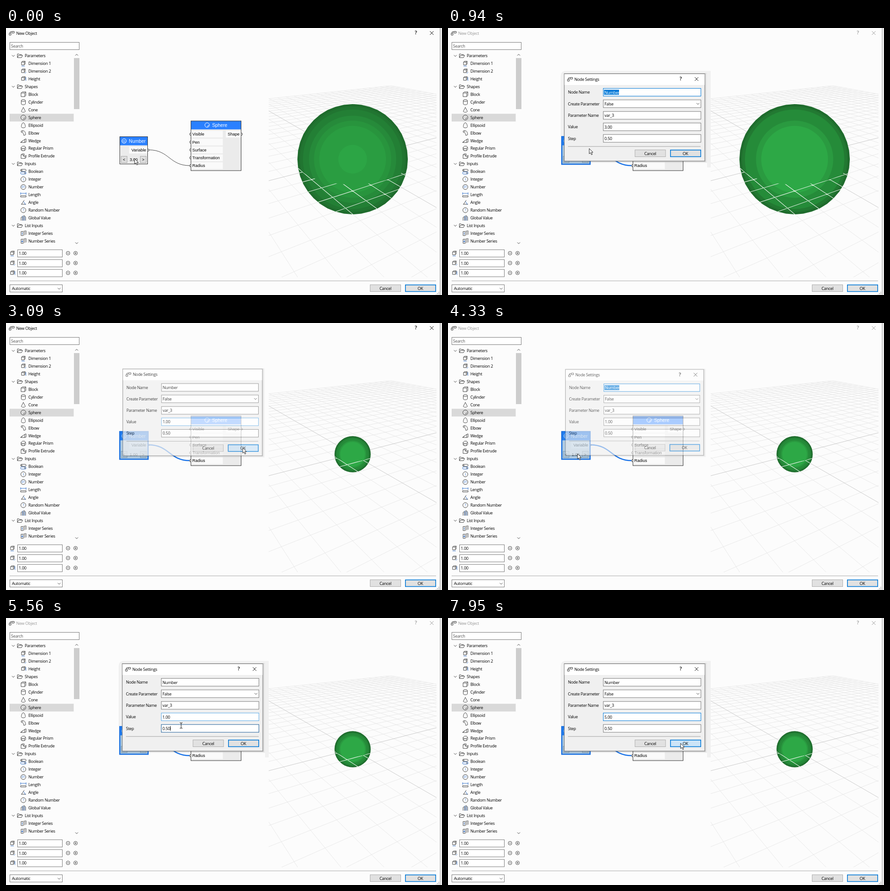
Recreate the animation shown at these times as an HTML page. Size 956 by 586 pixels, loop 8 s.

```html
<!DOCTYPE html>
<html lang="en">
<head>
<meta charset="utf-8">
<title>Node editor</title>
<style>
html, body { margin: 0; width: 100%; height: 100%; overflow: hidden; background: #fcfcfc; }
svg { display: block; width: 956px; height: 586px; }
text { font: 9px "Open Sans", "Noto Sans", sans-serif; letter-spacing: -.3px; fill: #000; white-space: pre; }
.node text { font: 9px "Liberation Sans", Arial, sans-serif; letter-spacing: 0; }
.node text.head { font-size: 10.3px; fill: #fff; }
.icon { fill: none; stroke: #333; stroke-width: .9; }
.icon .b, .icon.b { stroke: #2468c8; }
</style>
</head>
<body>
<svg viewBox="0 0 956 586" xmlns="http://www.w3.org/2000/svg">
  <defs>
    <clipPath id="view"><rect x="576" y="120" width="368" height="427"/></clipPath>
    <clipPath id="front"><path id="frontPath"/></clipPath>
    <linearGradient id="edge"><stop stop-color="#d4d4d4"/><stop offset="1" stop-color="#f4f4f4"/></linearGradient>
  </defs>
  <rect width="956" height="586" fill="#fcfcfc"/>
  <g id="frame"></g>
  <g id="sidebar"></g>
  <g id="floor" clip-path="url(#view)"></g>
  <g id="ball"></g>
  <g clip-path="url(#front)"><path id="overlay" fill="none" stroke="#eef5ee" stroke-width="1.1"/></g>
  <g id="nodes" class="node"></g>
  <g id="dialog"></g>
  <g id="cursor"></g>
</svg>
<script>
const LOOP = 8000;
const $ = id => document.getElementById(id);
const BLUE = '#0078d7';

const text = (x, y, s, extra = '') => `<text x="${x}" y="${y + 3.2}" ${extra}>${s.replace(/</g, '&lt;')}</text>`;
const mid = 'text-anchor="middle"';
const rect = (x, y, w, h, fill, stroke = 'none', sw = 1) =>
  `<rect x="${x}" y="${y}" width="${w}" height="${h}" fill="${fill}" stroke="${stroke}" stroke-width="${sw}"/>`;
const path = (d, extra = '') => `<path d="${d}" ${extra}/>`;
const circle = (x, y, r, extra = '') => `<circle cx="${x}" cy="${y}" r="${r}" ${extra}/>`;
const icon = (x, y, body) => `<g class="icon" transform="translate(${x} ${y})">${body}</g>`;
const line = (x, y, d, color = '#333', w = 1) =>
  `<path transform="translate(${x} ${y})" d="${d}" fill="none" stroke="${color}" stroke-width="${w}"/>`;
const chevron = (x, y, up) => line(x, y, up ? 'M-3 1.5L0 -1.5L3 1.5' : 'M-3 -1.5L0 1.5L3 -1.5', '#444');
const closeMark = (x, y, color) => line(x, y, 'M-4 -4L4 4M4 -4L-4 4', color);
const helpMark = (x, y, color) => text(x, y, '?', `${mid} style="fill:${color};font-size:11px;font-weight:600"`);
const appIcon = (x, y, color) => line(x, y, 'M-5 0h4v4h-4zM1 -4h5v3.500h-5zM-3 0v-3h4', color);
const button = (x, y, label, primary, hover) =>
  (primary
    ? rect(x + 1.3, y + .8, 66.4, 14.6, hover ? '#cce4f7' : '#e1e1e1', BLUE, 1.6)
    : rect(x + .5, y + .5, 67, 15, '#e1e1e1', '#adadad')) +
  text(x + 34, y + 8.5, label, mid);

/* ---------- icons, drawn around 0,0 ---------- */
const cube = path('M-5 -3H3V5H-5ZM-5 -3L-2.500 -5.500H5.500L3 -3M5.500 -5.500V2.500L3 5');
const smallCube = path('M-4 -3H2V3H-4ZM-4 -3L-2 -5H4L2 -3M4 -5V1L2 3');
const blue = d => path(d, 'class="b"');
const ring = s => circle(0, 0, 5.5) + `<text text-anchor="middle" y="2.500" style="font-size:7px;fill:#2468c8;stroke:none">${s}</text>`;
const sphereIcon = circle(0, 0, 5.5) + path('M3 0A3.500 3.500 0 0 1 0 3');
const series = path('M-5 -4H0V5H-5ZM1 -5H3V4M4 -5.500H6V3') + blue('M-2.500 -2V3');
const ICONS = {
  'Dimension 1': smallCube + blue('M-4 5.500H3'),
  'Dimension 2': smallCube + blue('M3 5L6 2'),
  'Height': smallCube + blue('M5.500 -4V4'),
  'Block': cube,
  'Cylinder': path('M-4.500 -3.500V4C-4.500 6.500 4.500 6.500 4.500 4V-3.500') + '<ellipse cy="-3.500" rx="4.500" ry="2"/>',
  'Cone': path('M0 -5.500L-4.500 3.500C-3 6 3 6 4.500 3.500Z'),
  'Sphere': sphereIcon,
  'Ellipsoid': path('M0 -5.500C3 -5.500 4.500 1 4.500 3C4.500 6.500 -4.500 6.500 -4.500 3C-4.500 1 -3 -5.500 0 -5.500Z'),
  'Elbow': path('M-5 -4L-1 -5.500C3 -5 5 -1 5 4L1 5.500C1 1 -1 -1 -4 -1ZM-3 -4L0 -2'),
  'Wedge': path('M-6 4L3 -3L6 -4V3L3 4ZM3 4V-3M-6 4L-2 0'),
  'Regular Prism': path('M-5 -2L-2 -5H3L5 -2L2 0H-3ZM-5 -2V3L-3 5H2L5 3V-2M-3 0V5M2 0V5'),
  'Profile Extrude': path('M-5 -3H0V0H4V5H-5ZM-5 -3L-3 -5H2V-2L0 0M4 0L6 -2V3L4 5'),
  'Boolean': '<rect x="-6" y="-5" width="12" height="4.500" rx="2"/><rect class="b" x="-6" y="1" width="12" height="4.500" rx="2"/>' + circle(-3.5, -2.7, 1) + circle(3.5, 3.2, 1),
  'Integer': ring('1'),
  'Number': ring('01'),
  'Length': blue('M-6 -5V0M6 -5V0M-6 -3H6') + path('M-6 2H6V5H-6Z'),
  'Angle': path('M-5 4H6M-4 4L2 -5') + blue('M0 -2Q4 0 4 5'),
  'Random Number': ring('?'),
  'Global Value': path('M-5 6V-1L-2 -3V6M1 6V-5Q4 -5 5 -1V6') + blue('M-1 6V-5M3 6V-3'),
  'Integer Series': series,
  'Number Series': series + blue('M-5 1H0'),
};
const GROUPS = {
  Parameters: ['Dimension 1', 'Dimension 2', 'Height'],
  Shapes: ['Block', 'Cylinder', 'Cone', 'Sphere', 'Ellipsoid', 'Elbow', 'Wedge', 'Regular Prism', 'Profile Extrude'],
  Inputs: ['Boolean', 'Integer', 'Number', 'Length', 'Angle', 'Random Number', 'Global Value'],
  'List Inputs': ['Integer Series', 'Number Series'],
};

function sidebar() {
  let out = rect(8.5, 31.5, 152, 16, '#fff', '#7a7a7a') + text(11, 40, 'Search', 'style="fill:#555"');
  let y = 61;
  const next = () => y += 16.94;
  for (const [group, items] of Object.entries(GROUPS)) {
    out += chevron(16, y) + text(41, y, group) +
      icon(30, y, path('M-5 4V-4H-1.500L0 -2.500H4V-1M-5 4L-2.500 -1H6.500L4 4Z'));
    next();
    for (const name of items) {
      if (name === 'Sphere') out += rect(8, y - 8.3, 140.500, 17, '#d9d9d9');
      out += icon(38, y, ICONS[name]) + text(49, y, name);
      next();
    }
  }
  out += rect(149, 66, 12, 112, '#cdcdcd') + chevron(155, 59, true) + chevron(155, 472);
  ['Dimension 1', 'Dimension 2', 'Height'].forEach((name, i) => {
    const cy = 494.7 + i * 21.6;
    out += icon(14, cy, ICONS[name]) + rect(25.5, cy - 8, 98, 16, '#fff', '#7a7a7a') + text(28, cy + .3, '1.00');
    out += icon(136, cy - .5, circle(0, 0, 4) + path('M-2 0H2')) + icon(152.5, cy - .5, circle(0, 0, 4) + path('M-2 0H2M0 -2V2'));
  });
  return out;
}

function frame(active) {
  const ink = active ? '#000' : '#999';
  return appIcon(12, 11.5, '#333') + text(22.5, 11.5, 'New Object', `style="fill:${ink}"`) +
    helpMark(898.5, 11, ink) + closeMark(933.5, 11, ink) +
    rect(951, 0, 1, 586, active ? '#aaa' : '#c4c4c4') + rect(952, 0, 4, 586, 'url(#edge)') +
    rect(8, 554.500, 935, 1, '#a8a8a8') +
    rect(8.5, 563.500, 115, 16, '#fff', '#7a7a7a') + text(13, 572, 'Automatic') + chevron(116.5, 572) +
    button(798, 563, 'Cancel') + button(874.5, 563, 'OK', true) +
    line(949, 583, 'M0 -4V-2M0 -1V1M-3 -1V1M0 2V3M-3 2V3M-6 2V3', '#aaa', 1.5);
}

/* ---------- 3D view: ground grid seen by a perspective camera ---------- */
const CX = 760, CY = 288, FOCAL = 626, DIST = 15.8, HALF = 20;
const PITCH = .395, YAW = .588;
const depth = Y => DIST + Y * Math.cos(PITCH);
const project = (X, Y) => [CX + FOCAL * X / depth(Y), CY - FOCAL * Y * Math.sin(PITCH) / depth(Y)];
const pt = p => p.map(v => v.toFixed(1)).join(' ');

function gridLine(k, family) {
  const c = Math.cos(YAW), s = Math.sin(YAW);
  const [ox, oy, dx, dy] = family ? [-s * k, c * k, c, s] : [c * k, s * k, -s, c];
  const near = ((.5 - DIST) / Math.cos(PITCH) - oy) / dy;
  const from = Math.max(-HALF, near);
  if (from >= HALF) return '';
  const end = q => pt(project(ox + dx * q, oy + dy * q));
  return `M${end(from)}L${end(HALF)}`;
}
let grid = '';
for (let k = -HALF; k <= HALF; k++) if (k) grid += gridLine(k, 0) + gridLine(k, 1);
const axes = gridLine(0, 0) + gridLine(0, 1);

function ball(radius, smooth) {
  const R = FOCAL * radius / Math.sqrt(DIST * DIST - radius * radius);
  const corners = Array.from({ length: 40 }, (_, i) =>
    [CX + R * Math.cos(i * Math.PI / 20), CY + R * Math.sin(i * Math.PI / 20)]);
  const bands = smooth
    ? [[.955, '#217531'], [.9, '#237f35'], [.79, '#268a3a'], [.7, '#28943d'], [.605, '#2a9d41'], [.26, '#2ca545']]
    : radius > 2
      ? [[.955, '#227932'], [.9, '#258b39'], [.7, '#2a9a40'], [.605, '#2da846']]
      : [[.94, '#227c34'], [.88, '#258b39'], [.75, '#2a9a40'], [.68, '#2da846']];
  const tilt = Math.asin(radius / (DIST * Math.cos(PITCH)));
  const rim = [];
  for (let i = 0; i <= 30; i++) {
    const a = Math.PI + tilt + (Math.PI - 2 * tilt) * i / 30;
    rim.push(pt(project(radius * Math.cos(a), radius * Math.sin(a))));
  }
  $('frontPath').setAttribute('d', `M${rim.join('L')}A${R} ${R} 0 0 1 ${rim[0]}Z`);
  return `<polygon points="${corners.map(pt).join(' ')}" fill="#1f6c2d"/>` +
    bands.map(([q, color]) => circle(CX, CY, (R * q).toFixed(1), `fill="${color}"`)).join('');
}

/* ---------- nodes ---------- */
const port = (x, y, right) => path(`M${x} ${y - 2.5}a2.500 2.500 0 0 ${right ? 1 : 0} 0 5`, 'fill="#fff" stroke="#333"');

function nodes(value, selected) {
  let out = path('M313 267.500C358 267.500 358 302 403 302',
    `fill="none" stroke="${selected ? '#1a73e8' : '#444'}" stroke-width="${selected ? 2.4 : 1}"`);
  out += rect(405.5, 204, 110, 109, '#ebebeb') + rect(405.5, 204, 110, 18.5, '#2a80ff');
  ['Visible', 'Pen', 'Surface', 'Transformation', 'Radius'].forEach((name, i) => {
    const y = 233 + i * 17.3;
    out += rect(406, y - 7.5, 69.5, 15, '#fafafa') + text(408.5, y, name) + port(405, y);
  });
  out += rect(482, 225.5, 33, 15, '#fafafa') + text(486, 233, 'Shape') + port(516, 233, true) +
    rect(405.5, 204, 110, 109, 'none', '#333') +
    `<g fill="none" stroke="#fff">${circle(441, 213, 5)}${path('M444 213A3 3 0 0 1 441 216')}</g>` +
    text(452, 213.5, 'Sphere', 'class="head"');

  out += rect(249.5, 238.5, 61, 60, '#ebebeb') + rect(249.5, 238.5, 61, 19, '#2a80ff') +
    circle(259, 248, 5, 'fill="none" stroke="#fff"') + text(259, 247.4, '01', `${mid} style="font-size:6.500px;fill:#fff"`) +
    text(269.5, 248.5, 'Number', 'class="head"') +
    rect(270, 260.5, 40, 15, '#fafafa') + text(275, 268, 'Variable') + port(311, 268, true) +
    rect(252.5, 281.5, 13, 14, '#dedede', '#aaa') + rect(294.5, 281.5, 13, 14, '#dedede', '#aaa') +
    text(259, 288.5, '<', mid) + text(301, 288.5, '>', mid) + text(280, 288.5, value, mid);
  out += selected
    ? rect(249.5, 238.5, 62, 60.500, 'rgba(20,120,200,.28)', '#1a70e0', 2.6)
    : rect(249.5, 238.5, 61, 60, 'none', '#333');
  return out;
}

/* ---------- dialog ---------- */
const FIELD_Y = [141, 166.3, 191.7, 217, 242.3];
const LABELS = ['Node Name', 'Create Parameter', 'Parameter Name', 'Value', 'Step'];

function dialog(s) {
  if (!s.opacity) return '';
  const ghost = s.opacity === 1
    ? path('M247 237V106Q247 94 259 94H576V306H568V100H255V237Z', 'fill="#f1f1f1"') : '';
  let out = rect(254, 99, 314, 197, 'rgba(0,0,0,.06)') + rect(254, 99, 311.5, 195, 'rgba(0,0,0,.12)') +
    rect(255, 100.5, 308, 191.500, '#f0f0f0', '#777') + rect(255.5, 101, 307, 24, '#fff') +
    appIcon(267, 112.500, '#333') + text(277, 112.500, 'Node Settings');
  if (!s.closing) out += helpMark(510, 112, '#000') + closeMark(545, 112, '#222');
  ['Number', 'False', 'var_3', s.value, '0.50'].forEach((content, i) => {
    const y = FIELD_Y[i], focus = s.focus === i;
    const leaving = i === 3 && (s.focus === 4 || s.closing);
    const width = i ? 19 : 33;
    const border = leaving ? '#5aa9e6' : !focus ? '#7a7a7a' : i === 4 ? '#1b5c96' : BLUE;
    out += text(263, y, LABELS[i]) + rect(340.5, y - 8.5, 214, 17, '#fff', border);
    const start = focus ? Math.max(0, Math.min(width, s.selectFrom - 342)) : width;
    if (start < width) out += rect(342 + start, y - 5.5, width - start, 11, BLUE);
    out += text(343, y + .3, content, focus && start < width / 2 ? 'style="fill:#fff"' : '');
    if (focus && start >= width && i === 4) out += rect(360, y - 5, 1, 10, '#000');
    if (i === 1) out += chevron(548, y);
  });
  out += rect(263, 259.5, 291, 1, '#a0a0a0') + button(409.5, 267, 'Cancel') + button(486.5, 267, 'OK', true, s.hover);
  return `${ghost}<g opacity="${s.opacity}" transform="translate(409 196) scale(${s.scale}) translate(-409 -196)">${out}</g>`;
}

/* ---------- timeline ---------- */
// [start, end, number of picture changes]
const BURSTS = [[380, 1400, 8], [1520, 1880, 4], [2290, 3330, 9], [3450, 3870, 4],
  [4330, 5300, 8], [5440, 6470, 9], [6620, 6620, 1], [7040, 7950, 8]];
const POINTER = [[0, 282, 287], [530, 282, 287], [1400, 366, 219], [1520, 364, 217], [1880, 318, 217],
  [2290, 318, 217], [2940, 519, 274], [3200, 519, 274], [3330, 437, 270], [3870, 284, 287],
  [4470, 284, 287], [5300, 394, 226], [5570, 384, 236], [5830, 364, 217], [6470, 277, 213],
  [6620, 277, 219], [7040, 277, 219], [7950, 510, 275]];

function snap(t) {
  const burst = BURSTS.findLast(b => t >= b[0]);
  if (!burst) return 0;
  const [a, b, n] = burst;
  if (n === 1) return a;
  const step = (b - a) / (n - 1);
  return a + Math.min(n - 1, Math.floor((t - a + 12) / step)) * step;
}

function pointerAt(t) {
  const i = POINTER.findLastIndex(p => t >= p[0]);
  const [t0, x0, y0] = POINTER[i];
  const [t1, x1, y1] = POINTER[i + 1] || [t0 + 1, x0, y0];
  const q = (t - t0) / (t1 - t0);
  return [x0 + (x1 - x0) * q, y0 + (y1 - y0) * q];
}

function cursor([x, y], open) {
  const beam = open && x > 341 && x < 555 && FIELD_Y.some((f, i) => i !== 1 && Math.abs(f - y) < 8.5);
  const shape = beam
    ? line(0, 0, 'M-3 -6H-1L0 -5L1 -6H3M0 -5V5M-3 6H-1L0 5L1 6H3', '#111')
    : path('M0 0V11.500L2.700 9L4.800 13.600L6.800 12.700L4.700 8.300H8.300Z', 'fill="#fff" stroke="#111" stroke-width=".9"');
  return `<g transform="translate(${x.toFixed(1)} ${y.toFixed(1)})">${shape}</g>`;
}

function dialogState(t, pointer) {
  const s = { opacity: 0, scale: 1, focus: 3, selectFrom: 999, hover: false, value: '3.00' };
  s.closing = t >= 3090 && t < 3210;
  if (t >= 530 && t < 3210) s.opacity = t < 650 ? .6 : s.closing ? .72 : 1;
  if (t >= 4330) s.opacity = t < 4460 ? .6 : 1;
  s.scale = s.opacity === .6 ? .983 : s.closing ? .993 : 1;
  if (t < 1510 || (t >= 4330 && t < 5020)) { s.focus = 0; s.selectFrom = 0; }
  else if (t >= 5430 && t < 5680) s.focus = 4;
  else if (t < 2290 || (t >= 5800 && t < 7040)) s.selectFrom = pointer[0];
  if (t >= 2290) s.value = t < 2920 ? '1' : '1.00';
  if (t >= 7040) s.value = t < 7800 ? '5' : '5.00';
  s.hover = pointer[0] > 487 && pointer[1] > 267;
  return s;
}

const shown = {};
function put(id, key, make) {
  if (shown[id] === key) return;
  shown[id] = key;
  $(id).innerHTML = make();
}

function render(t) {
  const pointer = pointerAt(snap(t));
  const s = dialogState(t, pointer);
  const active = !s.opacity || s.closing;
  const applied = t >= 3090;
  put('frame', active, () => frame(active));
  put('ball', `${applied}${t < 380}`, () => ball(applied ? 1 : 3, t < 380));
  put('nodes', `${applied}${t < 380}`, () => nodes(applied ? '1.00' : '3.00', t >= 380));
  put('dialog', JSON.stringify(s), () => dialog(s));
  put('cursor', `${pointer}${s.opacity}`, () => cursor(pointer, s.opacity === 1));
}

$('sidebar').innerHTML = sidebar();
$('floor').innerHTML = path(grid, 'fill="none" stroke="#e4e4e4" stroke-width=".8"') +
  path(axes, 'fill="none" stroke="#c4c4c4" stroke-width=".9"');
$('overlay').setAttribute('d', grid + axes);

const began = performance.now();
function tick() {
  render((performance.now() - began) % LOOP);
  requestAnimationFrame(tick);
}
tick();
</script>
</body>
</html>
```
